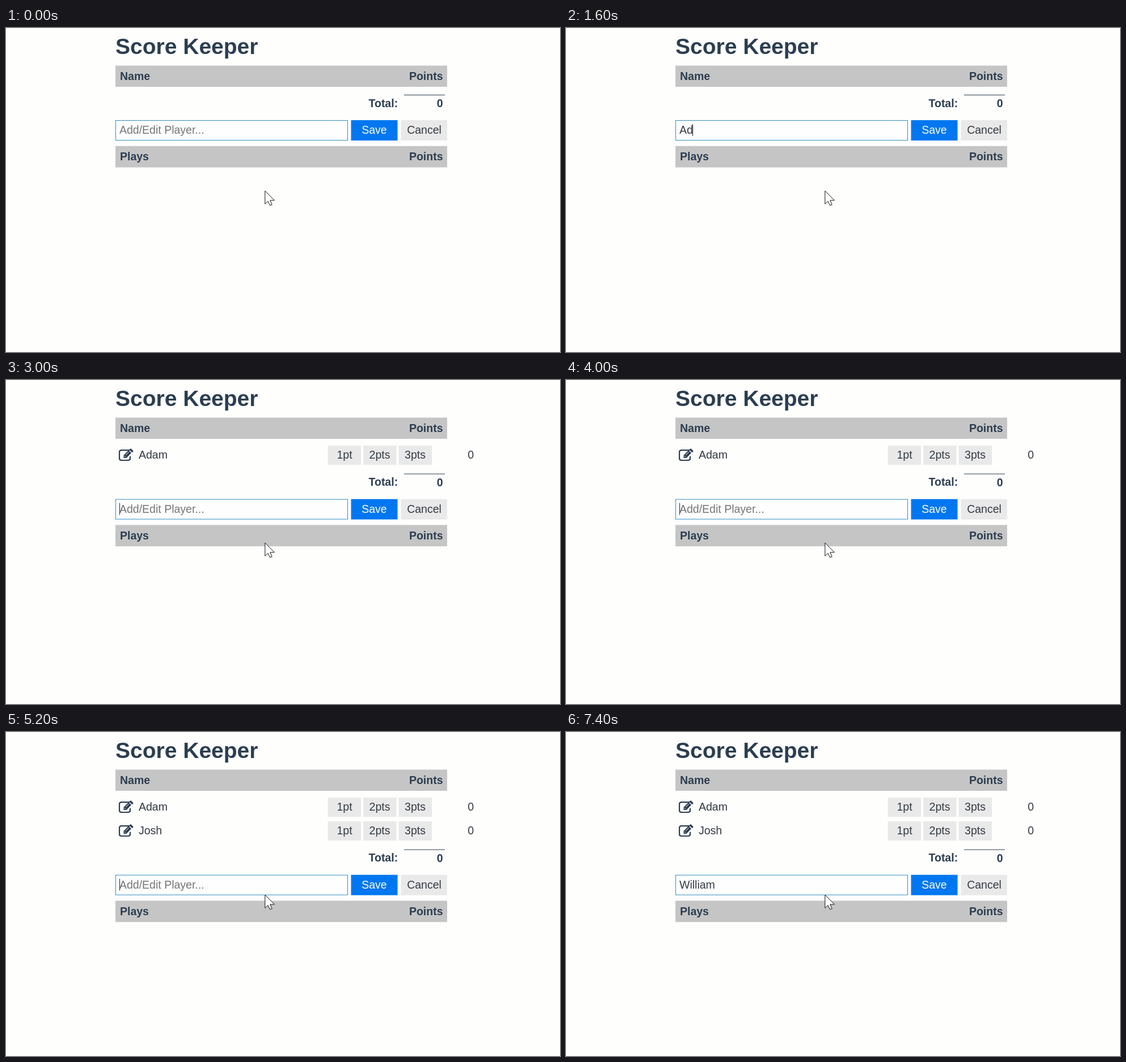
These frames come from a looping animation (977 by 573 pixels, 8000 ms). An HTML page:

```html
<!DOCTYPE html>
<html lang="en">
<head>
<meta charset="utf-8">
<title>Score Keeper</title>
<style>
  html, body { margin: 0; width: 100%; height: 100%; overflow: hidden; background: #fefefd; }
  svg { display: block; width: 977px; height: 573px; }
  text { font: 19.5px "Liberation Sans", Arial, sans-serif; fill: #333a42; }
  .bold { font-weight: bold; fill: #2c3e50; }
  .title { font-size: 39px; }
  .mid { text-anchor: middle; }
  .end { text-anchor: end; }
  .bar { fill: #c5c5c5; }
  .button { fill: #e9e9ea; }
  .icon { fill: none; stroke: #2c3e50; stroke-width: 2.2; stroke-linecap: round; }
</style>
</head>
<body>
<svg viewBox="0 0 977 573">
  <defs>
    <g id="controls">
      <path class="icon" d="M217 124.2H203.5Q200 124.2 200 127.7V138.5Q200 142 203.5 142H215.5Q219 142 219 138.5V135.5"/>
      <path fill="#2c3e50" d="M207.5 138V133L216.2 124.3L221 129.1L212.2 138ZM217.2 123.3L218.7 121.8Q219.8 120.9 220.9 121.8L224.1 125Q225 126 224.1 127.1L222.2 128.1Z"/>
      <path stroke="#fefefd" d="M211 133L216.5 127.5M208.8 134.2L211 136.4"/>
      <path class="button" d="M567.5 116h58.5v34h-58.5zM630 116h58.5v34h-58.5zM692.5 116h58.5v34h-58.5z"/>
      <text class="mid" x="597" y="139">1pt</text>
      <text class="mid" x="659" y="139">2pts</text>
      <text class="mid" x="721.5" y="139">3pts</text>
      <text class="end" x="825" y="139">0</text>
    </g>
  </defs>

  <text class="bold title" x="193" y="46">Score Keeper</text>
  <rect class="bar" x="193" y="66.5" width="585" height="37.5"/>
  <text class="bold" x="201" y="92">Name</text>
  <text class="bold end" x="770.5" y="92">Points</text>

  <g class="player"><use href="#controls"/><text x="234" y="139">Adam</text></g>
  <g class="player" transform="translate(0 42)"><use href="#controls"/><text x="234" y="139">Josh</text></g>

  <g id="lower">
    <rect x="702" y="118" width="72" height="1" fill="#2c3e50"/>
    <text class="bold" x="639.5" y="139.5">Total:</text>
    <text class="bold end" x="770.5" y="140">0</text>

    <rect x="193.5" y="163.5" width="409" height="35" fill="#fefefe" stroke="#2f8fc0"/>
    <text id="entry" x="200" y="187"></text>
    <rect id="caret" y="170" width="1" height="21" fill="#222"/>
    <rect x="608.5" y="163" width="82" height="36" fill="#0077f0"/>
    <text class="mid" x="649.5" y="187" style="fill:#fff">Save</text>
    <rect class="button" x="696.5" y="163" width="81.5" height="36"/>
    <text class="mid" x="737.5" y="187">Cancel</text>

    <rect class="bar" x="193" y="208.8" width="585" height="37.7"/>
    <text class="bold" x="201" y="234">Plays</text>
    <text class="bold end" x="770.5" y="234">Points</text>
  </g>

  <path fill="#fff" stroke="#111" d="M456.8 288V311.3L462 306.4L465.6 313.8L469.2 312.4L465.8 304.9H473.4Z"/>
</svg>
<script>
  const LOOP = 8000;
  const SHIFTS = [0, 47.6, 89.6]; // by number of players

  // [start ms, typed text, caret shown, players listed]
  const STEPS = [
    [0, "", false, 0], [200, "", true, 0], [600, "", false, 0], [1200, "", true, 0],
    [1400, "A", true, 0], [1600, "Ad", true, 0], [1800, "Ada", true, 0], [2200, "Adam", true, 0],
    [3000, "", true, 1], [3400, "", false, 1], [4000, "", true, 1],
    [4200, "J", true, 1], [4400, "Jos", true, 1], [4800, "Josh", true, 1],
    [5200, "", true, 2], [5800, "", false, 2],
    [6200, "W", true, 2], [6400, "Wil", true, 2], [6800, "Willi", true, 2],
    [7000, "William", true, 2], [7400, "William", false, 2],
  ];

  const lower = document.getElementById("lower");
  const entry = document.getElementById("entry");
  const caret = document.getElementById("caret");
  const rows = document.querySelectorAll(".player");
  let shown;

  function show([, typed, caretOn, players]) {
    entry.textContent = typed || "Add/Edit Player...";
    entry.style.fill = typed ? "" : "#757575";
    const width = typed ? entry.getComputedTextLength() : 0;
    caret.setAttribute("x", Math.floor(200 + width));
    caret.style.display = caretOn ? "" : "none";
    rows.forEach((row, i) => row.style.display = i < players ? "" : "none");
    lower.setAttribute("transform", `translate(0 ${SHIFTS[players]})`);
  }

  const origin = performance.now();
  function tick() {
    const time = (performance.now() - origin) % LOOP;
    const step = STEPS.findLast(([start]) => start <= time);
    if (step !== shown) show(shown = step);
    requestAnimationFrame(tick);
  }
  tick();
</script>
</body>
</html>
```
